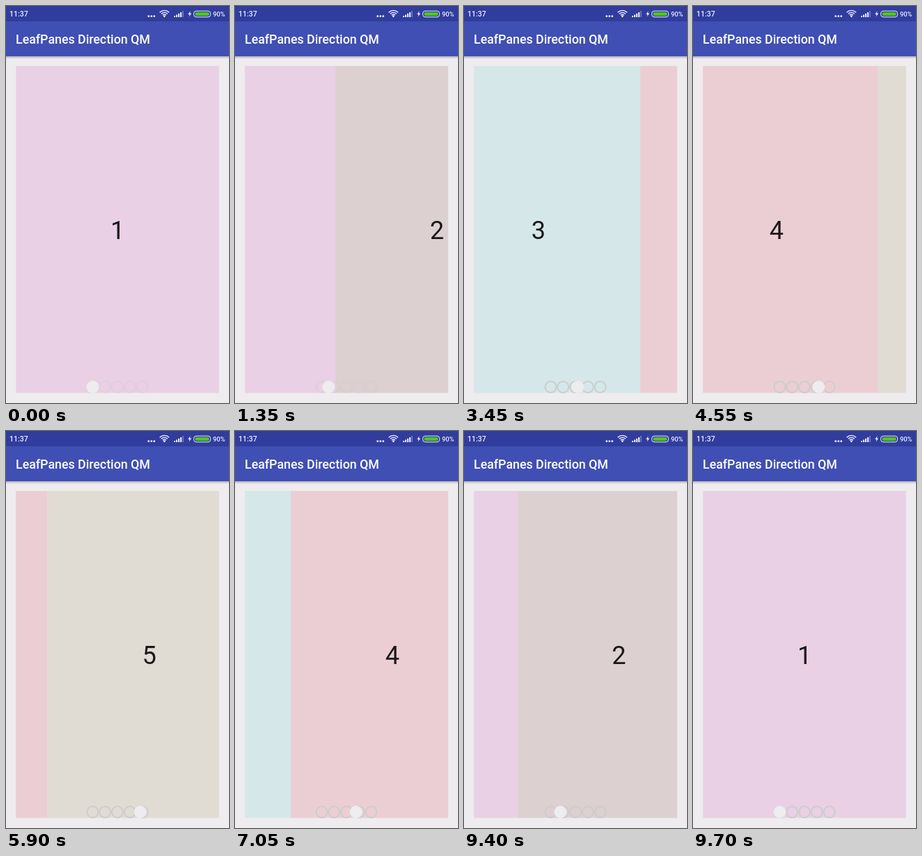
An HTML page that plays this animation: 320 by 569 pixels, repeating every 9850 ms.

```html
<!DOCTYPE html>
<html lang="en">
<head>
<meta charset="utf-8">
<title>Swipe pages</title>
<style>
  html, body { margin: 0; height: 100%; overflow: hidden; background: #eeecee; }
  svg { display: block; width: 100vw; height: 100vh; font-family: Roboto, sans-serif; }
</style>
</head>
<body>
<svg viewBox="0 0 320 569">
  <defs>
    <clipPath id="viewport"><rect x="14.2" y="86" width="291.6" height="468.6"/></clipPath>
    <linearGradient id="shadow" x2="0" y2="1">
      <stop stop-opacity=".25"/>
      <stop offset="1" stop-opacity="0"/>
    </linearGradient>
  </defs>

  <rect width="320" height="569" fill="#eeecee"/>
  <rect y="72" width="320" height="4" fill="url(#shadow)"/>
  <rect y="22" width="320" height="50" fill="#3f4fb3"/>
  <rect width="320" height="22" fill="#303d9d"/>
  <text x="14" y="54" font-size="17.8" font-weight="500" fill="#fff">LeafPanes Direction QM</text>

  <!-- Status bar -->
  <g fill="#eef" font-weight="500">
    <text x="5" y="15.3" font-size="10.5">11:37</text>
    <text x="297" y="15" font-size="9.3">90%</text>
    <circle cx="204.7" cy="14.7" r="1.4"/>
    <circle cx="208.7" cy="14.7" r="1.4"/>
    <circle cx="212.7" cy="14.7" r="1.4"/>
    <circle cx="227.3" cy="14.8" r="1.4"/>
    <path d="M220.5 9.2a9.6 9.6 0 0 1 13.6 0M222.7 11.3a6.5 6.5 0 0 1 9.2 0M224.8 13.3a3.5 3.5 0 0 1 5 0"
      fill="none" stroke="#eef" stroke-width="1.4"/>
    <path d="M241 14h2v2h-2zM244 12.5h2v3.5h-2zM247 10.7h2v5.3h-2zM250 9h2v7h-2z"/>
    <path d="M253 7h1.6v9h-1.6z" opacity=".4"/>
    <path d="M264.6 7l-3.4 5h2.2l-1 3.6 3.8-5.2h-2.4z"/>
    <rect x="269.5" y="7.2" width="24" height="8.6" rx="3.5" fill="none" stroke="#eef"/>
    <rect x="271.5" y="9" width="20" height="5" rx="1.8" fill="#52c41c"/>
  </g>

  <g clip-path="url(#viewport)"><g id="pages"></g></g>
  <g id="rings" fill="none" stroke="#ccc" stroke-width="2.1"></g>
  <circle id="dot" cy="546" r="9" fill="#eeecee"/>
</svg>
<script>
const LOOP = 9850, STEP = 50, LEFT = 14.2, PAGE_WIDTH = 291.6, DOT_GAP = 17.78, FIRST_DOT = 124.4;
const COLORS = ['#e9d0e4', '#dcd0d1', '#d5e7e9', '#ebced4', '#e0dcd4'];

// Each swipe: first step, last step, page left, page reached, sharpness of the settle
const SWIPES = [
  [1250, 1650, 0, 1, 2.95],
  [2350, 2700, 1, 2, 2.77],
  [3450, 3800, 2, 3, 2.9],
  [4550, 4950, 3, 4, 2.5],
  [5900, 6350, 4, 3, 3.3],
  [7050, 7350, 3, 2, 3.08],
  [8200, 8650, 2, 1, 3.55],
  [9400, 9700, 1, 0, 2.9]
];

const byId = id => document.getElementById(id);
const pages = byId('pages'), rings = byId('rings'), dot = byId('dot');

COLORS.forEach((color, i) => {
  const x = LEFT + i * PAGE_WIDTH;
  pages.innerHTML += `<rect x="${x}" y="86" width="${PAGE_WIDTH}" height="469" fill="${color}"/>
    <text x="${x + PAGE_WIDTH / 2}" y="334.2" font-size="36" text-anchor="middle" fill="#1a181a">${i + 1}</text>`;
  rings.innerHTML += `<circle cx="${FIRST_DOT + i * DOT_GAP}" cy="546" r="8"/>`;
});

function pageAt(time) {
  let page = 0;
  for (const [first, last, from, to, power] of SWIPES) {
    if (time < first) break;
    const u = Math.min(1, (time - first + STEP) / (last - first + STEP));
    page = from + (to - from) * (1 - (1 - u ** 1.3) ** power);
  }
  return page;
}

function draw(now) {
  const time = Math.floor(now % LOOP / STEP) * STEP;
  const page = pageAt(time);
  pages.setAttribute('transform', `translate(${-page * PAGE_WIDTH})`);
  dot.setAttribute('cx', FIRST_DOT + page * DOT_GAP);
  rings.setAttribute('opacity', time < 1650 ? .3 : .9);
  requestAnimationFrame(draw);
}
draw(performance.now());
</script>
</body>
</html>
```
